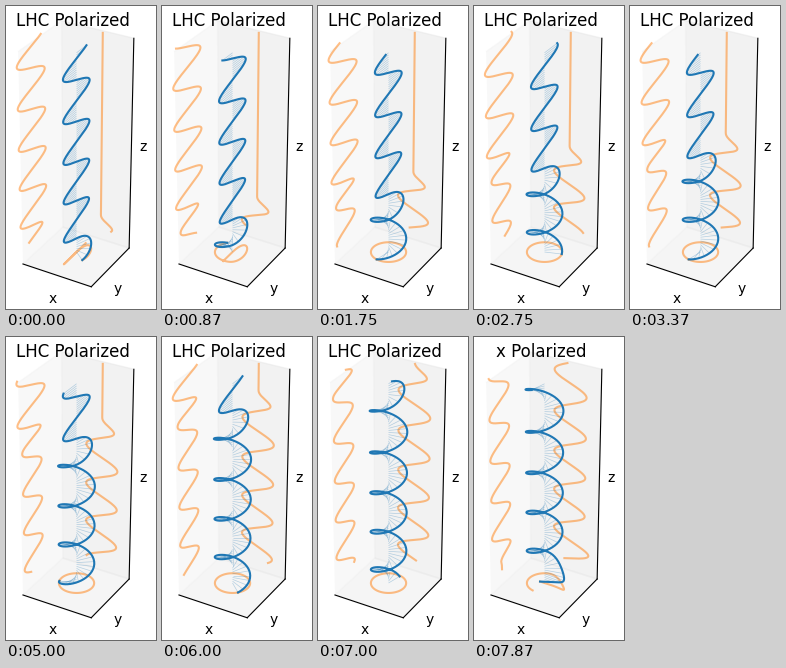
A matplotlib script for the animation above (8 s loop, 150 px wide and 303 px high).

```python
import numpy as np
import matplotlib.pyplot as plt
from matplotlib.animation import FuncAnimation
from mpl_toolkits.mplot3d.art3d import Line3DCollection

W, H, DPI = 150, 303, 100
FRAMES, STEP = 64, 125
PERIOD = 12                    # frames per wavelength
PHASE = np.radians(318)
SWITCHES = (-2, 58)            # when the polarization changes at z = 0
RAMP = 6
WALL = 2

# Jones vectors
Y_POL = np.array([0, 1])
LHC = np.array([1, -1j]) / np.sqrt(2)
X_POL = np.array([1, 0])

z = np.linspace(0, 5, 401)
z_rods = np.linspace(0, 5, 101)
z_trail = np.linspace(0, 1, 101)

fig = plt.figure(figsize=(W / DPI, H / DPI), dpi=DPI, facecolor="white")
side = 261
ax = fig.add_axes([-63.5 / W, 20 / H, side / W, side / H],
                  projection="3d", computed_zorder=False)
ax.patch.set_visible(False)
ax.set_box_aspect((1, 1, 3))
ax.set(xlim=(-1.5625, 1.5625), ylim=(-1.5625, 1.5625), zlim=(-0.107, 5.181),
       xticks=[], yticks=[], zticks=[])
ax.grid(False)


def label(x, y, text, size):
    return fig.text(x / W, 1 - y / H, text, size=size, ha="center", va="baseline")


title = label(67, 19.5, "", 12)
label(47, 297, "x", 10)
label(112, 287, "y", 10)
label(137, 145, "z", 10)

rods = Line3DCollection([np.zeros((2, 3))], colors="tab:blue", linewidths=0.5,
                        alpha=0.3, zorder=2)
ax.add_collection3d(rods)
shadows = [ax.plot([], [], [], color="tab:orange", alpha=0.5, lw=1.5, zorder=1)[0]
           for _ in range(3)]
wave, = ax.plot([], [], [], color="tab:blue", lw=1.5, zorder=3)


def ramp(t, centre):
    s = np.clip((t - centre) / RAMP + 0.5, 0, 1)
    return s * s * (3 - 2 * s)


def field(z, n):
    emitted = n - PERIOD * z
    a, b = (ramp(emitted, c)[:, None] for c in SWITCHES)
    jones = Y_POL * (1 - a) + LHC * (a - b) + X_POL * b
    carrier = np.exp(1j * (2 * np.pi * (z - n / PERIOD) + PHASE))
    return (jones * carrier[:, None]).real.T


def update(n):
    x, y = field(z, n)
    wave.set_data_3d(x, y, z)
    shadows[0].set_data_3d(np.full_like(z, -WALL), y, z)
    shadows[1].set_data_3d(x, np.full_like(z, WALL), z)
    shadows[2].set_data_3d(*field(z_trail, n), np.zeros_like(z_trail))

    tips = np.column_stack([*field(z_rods, n), z_rods])
    rods.set_segments(np.stack([tips * (0, 0, 1), tips], axis=1))
    title.set_text("LHC Polarized" if n < SWITCHES[1] else "x Polarized")
    return [wave, *shadows, rods, title]


anim = FuncAnimation(fig, update, frames=FRAMES, interval=STEP,
                     repeat=True, repeat_delay=0)
plt.show()
```
